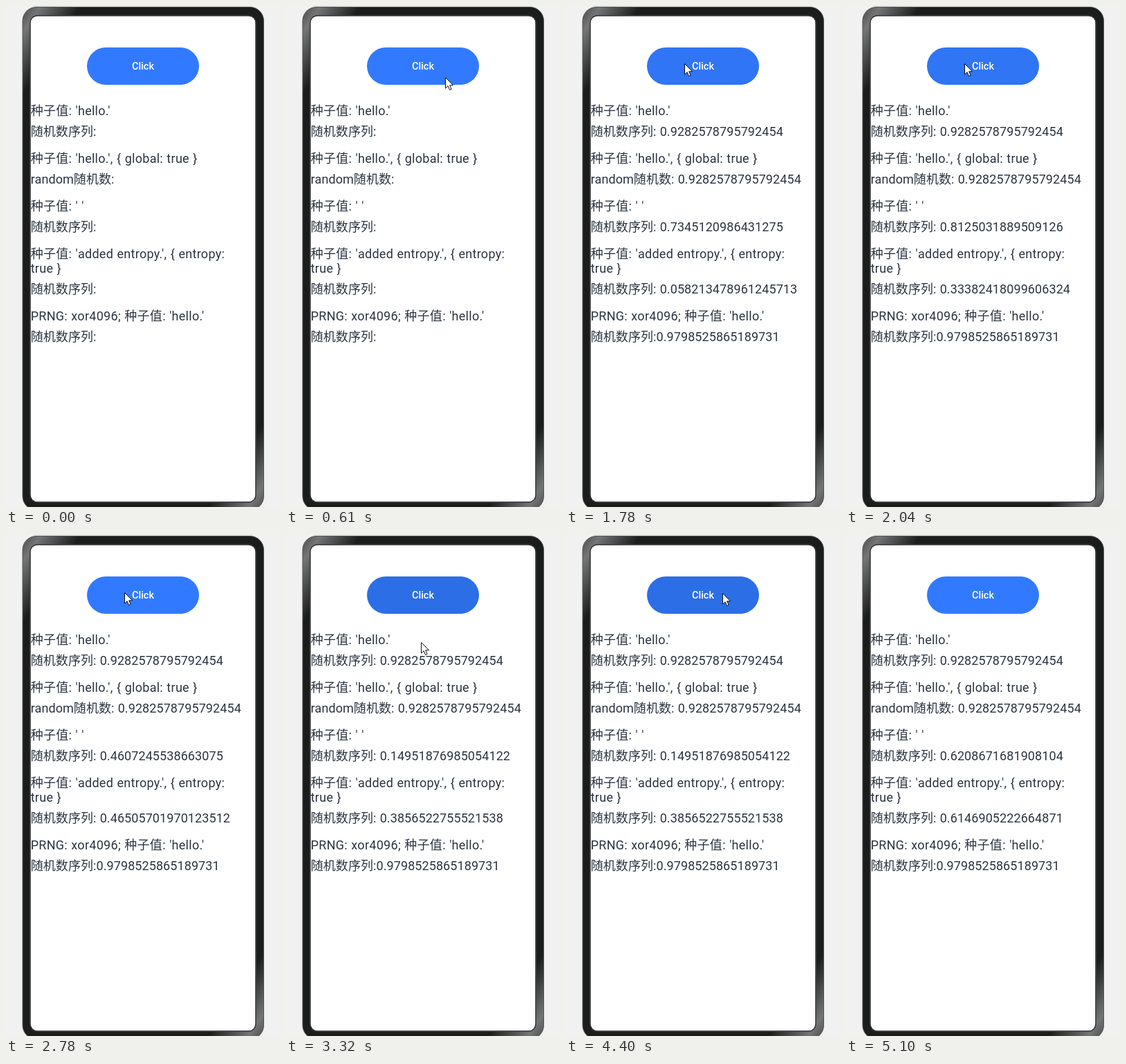
An HTML page that plays this animation: 396x725 px, repeating every 5.43 s.

```html
<!DOCTYPE html>
<html lang="zh-CN">
<head>
<meta charset="utf-8">
<title>Random numbers</title>
<style>
html, body { margin: 0; width: 100%; height: 100%; overflow: hidden; background: #f1f1f1; }
svg { display: block; width: 396px; height: 725px; }
text { font: 18px Roboto, 'Noto Sans CJK SC', 'Noto Sans CJK', sans-serif; fill: #2b3541; word-spacing: .6px; }
.label { letter-spacing: .28px; }
.result { letter-spacing: .08px; }
#caption { font-size: 14.5px; font-weight: 500; fill: #fff; text-anchor: middle; }
</style>
</head>
<body>
<svg viewBox="0 0 396 725">
  <defs>
    <linearGradient id="metal" gradientUnits="userSpaceOnUse" x1="24" y1="2" x2="601" y2="383">
      <stop offset="0" stop-color="#4c4c4c"/>
      <stop offset=".03" stop-color="#747576"/>
      <stop offset=".1" stop-color="#1b1c1c"/>
      <stop offset=".9" stop-color="#1b1c1c"/>
      <stop offset=".97" stop-color="#747576"/>
      <stop offset="1" stop-color="#4c4c4c"/>
    </linearGradient>
  </defs>
  <rect x="24" y="1.5" width="348.5" height="728" rx="20" fill="url(#metal)" stroke="#555"/>
  <rect x="34.5" y="13.5" width="327" height="705" rx="11" fill="#161616" stroke="#4a4a4a" stroke-width=".8"/>
  <rect x="35.7" y="14.7" width="324.6" height="702.6" rx="9.5" fill="#fff"/>
  <rect id="button" x="117" y="60" width="162" height="54" rx="27"/>
  <text id="caption" x="198" y="92">Click</text>
  <g id="lines"></g>
  <path id="cursor" d="M.5 .5v15.6l3.6-3.4 2.5 5.8 2.5-1.1-2.4-5.6h4.9z" fill="#fff" stroke="#111"/>
</svg>
<script>
const LOOP = 5430, TICKS = 80;
const $ = id => document.getElementById(id);

function addLine(y, text, kind) {
  const el = document.createElementNS('http://www.w3.org/2000/svg', 'text');
  el.setAttribute('x', 35.7);
  el.setAttribute('y', y);
  el.setAttribute('class', kind);
  el.textContent = text;
  $('lines').append(el);
  return el;
}

const blocks = [
  ["种子值: 'hello.'", '随机数序列: '],
  ["种子值: 'hello.', { global: true }", 'random随机数: '],
  ["种子值: ' '", '随机数序列: '],
  ["种子值: 'added entropy.', { entropy:\ntrue }", '随机数序列: '],
  ["PRNG: xor4096; 种子值: 'hello.'", '随机数序列:']
];
let y = 158;
const results = blocks.map(([label, prefix]) => {
  label.split('\n').forEach((line, i) => addLine(y += i * 21, line, 'label'));
  const el = addLine(y += 30, prefix, 'result');
  y += 39;
  return { prefix, el };
});

// Each click shows two new values; the seeded ones never change
const clicks = [
  { tick: 18, values: ['0.7345120986431275', '0.058213478961245713'] },
  { tick: 26, values: ['0.8125031889509126', '0.33382418099606324'] },
  { tick: 35, values: ['0.4607245538663075', '0.46505701970123512'] },
  { tick: 46, values: ['0.14951876985054122', '0.3856522755521538'] },
  { tick: 63, values: ['0.6208671681908104', '0.6146905222664871'] }
];
const seeded = '0.9282578795792454', xor4096 = '0.9798525865189731';

const linear = k => k, easeIn = k => k ** 4, easeOut = k => 1 - (1 - k) ** 4;
const moves = [
  { start: 0, end: 9, from: [457, 994], to: [230, 103], ease: easeOut },
  { start: 10, end: 13, from: [230, 103], to: [217, 91], ease: linear },
  { start: 16, end: 20, from: [217, 91], to: [171, 83], ease: linear },
  { start: 45, end: 52, from: [171, 83], to: [400, 760], ease: easeIn },
  { start: 53, end: 62, from: [410, 560], to: [226, 84], ease: easeOut },
  { start: 66, end: 75, from: [226, 84], to: [376, 730], ease: easeOut }
];

function cursorAt(tick) {
  const { start, end, from, to, ease } = moves.findLast(m => m.start <= tick);
  const k = ease(Math.min(1, (tick - start) / (end - start)));
  return from.map((v, i) => Math.round(v + (to[i] - v) * k));
}

// Button highlight: quick rise, short hold, quick fall
const pressed = age => Math.max(0, Math.min(1, (age + .5) * .8, (4.7 - age) * .6));

function draw(tick) {
  const click = clicks.findLast(c => c.tick + 2 <= tick);
  const values = click ? [seeded, seeded, ...click.values, xor4096] : [];
  results.forEach(({ prefix, el }, i) => el.textContent = prefix + (values[i] || ''));

  // The first click gives no highlight
  const dark = Math.max(...clicks.slice(1).map(c => pressed(tick - c.tick)));
  const rgb = [49, 122, 255].map(c => Math.round(c * (1 - .1 * dark)));
  $('button').setAttribute('fill', `rgb(${rgb})`);
  $('cursor').setAttribute('transform', `translate(${cursorAt(tick)})`);
}

const begin = performance.now();
let last = -1;
function loop() {
  const time = (performance.now() - begin) % LOOP;
  const tick = Math.floor((time + 10) / LOOP * TICKS) % TICKS;
  if (tick !== last) draw(last = tick);
  requestAnimationFrame(loop);
}
loop();
</script>
</body>
</html>
```
